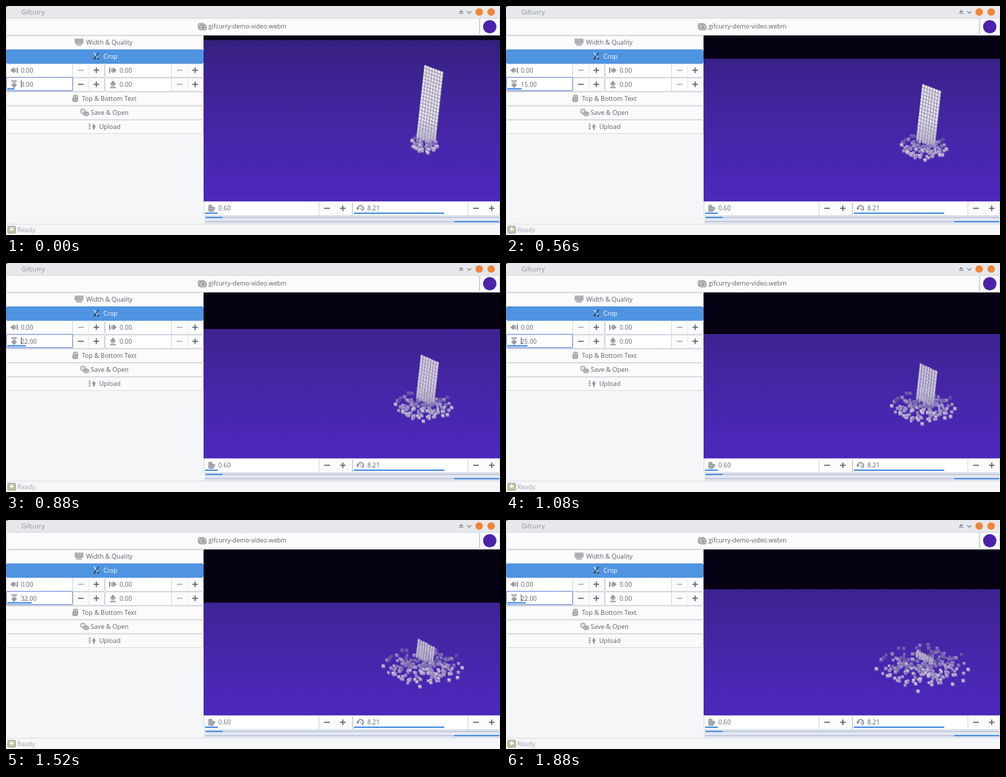
These frames come from a looping animation (700 by 326 pixels, 1920 ms). An HTML page with a canvas:

```html
<!DOCTYPE html>
<html lang="en">
<head>
<meta charset="utf-8">
<title>Crop demo</title>
<style>
html, body { margin: 0; width: 700px; height: 326px; overflow: hidden; background: #f5f6f7; }
canvas { display: block; }
</style>
</head>
<body>
<canvas id="stage" width="700" height="326"></canvas>
<script>
const ctx = document.getElementById('stage').getContext('2d');
const LOOP = 1920, STEP = 40, TAU = Math.PI * 2;
const INK = '#5c616c', BLUE = '#4a90e2', EDGE = '#d3d8e2', ICON = '#85888e', PALE = '#b4b6ba';

const rand = n => { const v = Math.sin(n * 12.9898) * 43758.5453; return v - Math.floor(v); };
const lerp = (a, b, k) => a + (b - a) * k;
const clamp = v => Math.max(0, Math.min(1, v));

// Linear interpolation through [time, value] points
function track(points, t) {
  let i = 1;
  while (i < points.length - 1 && t > points[i][0]) i++;
  const [t0, a] = points[i - 1], [t1, b] = points[i];
  return lerp(a, b, clamp((t - t0) / (t1 - t0)));
}

function rect(x, y, w, h, fill) { ctx.fillStyle = fill; ctx.fillRect(x, y, w, h); }
function frame(x, y, w, h, fill, edge = EDGE) {
  ctx.beginPath();
  ctx.roundRect(x + .5, y + .5, w - 1, h - 1, 1.5);
  ctx.fillStyle = fill; ctx.fill();
  ctx.lineWidth = 1; ctx.strokeStyle = edge; ctx.stroke();
}
function disc(x, y, r, fill) {
  ctx.beginPath(); ctx.arc(x, y, r, 0, TAU); ctx.fillStyle = fill; ctx.fill();
}
function poly(points, fill) {
  ctx.beginPath(); points.forEach(p => ctx.lineTo(...p)); ctx.closePath();
  ctx.fillStyle = fill; ctx.fill();
}
function line(points, color, width = 1) {
  ctx.beginPath(); points.forEach(p => ctx.lineTo(...p));
  ctx.strokeStyle = color; ctx.lineWidth = width; ctx.stroke();
}
function text(s, x, y, color = INK, size = 8.8) {
  ctx.font = `500 ${size}px "Open Sans", "Noto Sans", sans-serif`;
  ctx.fillStyle = color; ctx.fillText(s, x, y);
}
function steppers(x, y, gap, minus) {
  rect(x - 4, y - .75, 8, 1.5, minus);
  rect(x + gap - 4, y - .75, 8, 1.5, INK);
  rect(x + gap - .75, y - 4, 1.5, 8, INK);
}

// Small grey icons, drawn around their centre
const icons = {
  film() {
    frame(-6, -5, 10, 9, '#d5d6d8', ICON); frame(-4, -3, 10, 8, '#c4c6c9', ICON);
    poly([[0, -1], [4, 1], [0, 3]], ICON);
  },
  screen() {
    rect(-6, -5, 12, 7, '#96989d');
    for (let i = -4; i < 2; i += 2) rect(-5, i, 10, .7, '#ddd');
    rect(-4, 2, 8, 3, PALE);
  },
  scissors() {
    line([[-3.5, -5], [2.5, 3]], '#dfe8f4', 1.3); line([[3.5, -5], [-2.5, 3]], '#39414d', 1.3);
    disc(-2.5, 3.5, 1.4, '#39414d'); disc(2.5, 3.5, 1.4, '#39414d');
  },
  arrow() {
    rect(-5.5, -4, 1.5, 8, ICON); rect(-3, -2.5, 4, 5, PALE);
    poly([[0, -4.5], [5.5, 0], [0, 4.5]], '#96989d');
  },
  page() {
    frame(-3, -5, 7, 7, '#e3e4e6', ICON); frame(-4, -1, 8, 6, PALE, ICON);
    rect(-1, -3, 3, 1, ICON);
  },
  save() {
    frame(-6, -5, 7, 7, '#e3e4e6', ICON); frame(-2, -1, 8, 6, '#c9cacd', ICON);
    rect(0, 1, 4, 1, ICON);
  },
  upload() {
    poly([[-1, 0], [2, -4], [5, 0], [2, 4]], PALE); rect(1.3, -3, 1.4, 8, ICON);
    for (let i = -4; i < 5; i += 3) rect(-5, i, 2, 2, ICON);
  },
  rows() {
    [6, 10, 8].forEach((w, i) => frame(-5, -5 + i * 3, w, 4, PALE, ICON));
  },
  dial() {
    ctx.beginPath(); ctx.arc(0, 0, 3.8, 2.8, 7.3);
    ctx.strokeStyle = '#96989d'; ctx.lineWidth = 2; ctx.stroke();
    poly([[-6, -1], [-2, -1], [-4, 3]], ICON); line([[-1, -1], [3, 4]], PALE, 1.4);
  }
};
function icon(name, x, y, turn = 0) {
  ctx.save(); ctx.translate(x, y); ctx.rotate(turn * TAU / 4); icons[name](); ctx.restore();
}

function button(y, label, x, name, ix, active) {
  frame(0, y, 280, 20, active ? '#4f94e1' : '#fbfbfc', active ? BLUE : '#dadde4');
  icon(name, ix, y + 9.5);
  text(label, x, y + 12.5, active ? '#fff' : INK, 9);
}
function spin(x, y, value, turn, focused) {
  frame(x, y, 140, 20, '#fbfbfc');
  frame(x, y, 95, 20, '#fff');
  if (focused) frame(x, y - 1, 95, 20, '#fff', '#7288d8');
  rect(x + 117, y + 2, 1, 16, '#e6e8ec');
  icon('arrow', x + 11.5, y + 9.5, turn);
  text(value.toFixed(2), x + 21, y + 12.5);
  steppers(x + 106, y + 9.5, 22, focused ? INK : '#a9acb2');
}
function range(x, w, value, name, barEnd) {
  frame(x, 278, w, 21, '#fbfbfc');
  frame(x, 278, 164, 21, '#fff');
  icon(name, x + 11.5, 288);
  text(value, x + 21, 291);
  rect(x + 2, 294, barEnd - x - 2, 2, BLUE);
  steppers(x + 175, 288, 22.3, INK);
}

function cube(x, y, s, light) {
  const tone = k => `rgb(${lerp(72, 208, k)},${lerp(48, 204, k)},${lerp(152, 219, k)})`;
  rect(x - s / 2, y - s / 2, s, s, tone(light * .7));
  rect(x - s / 2, y - s / 2, s * .75, s * .6, tone(light));
}

// Outermost cubes: start and end of each path
const strays = [[598, 209, 584, 244], [576, 192, 525, 212], [611, 200, 655, 213],
  [606, 205, 648, 229], [582, 203, 541, 222], [607, 203, 633, 234]];

function debris(t, back) {
  const k = t / 1880, count = 55 + 170 * k;
  const rx = 19 + 47 * k, ry = 15 + 20 * k, cy = 195 + 12 * clamp(t / 1500);
  for (let i = 0; i < count; i++) {
    const a = rand(i + 1) * TAU, depth = Math.sin(a);
    if ((depth < -.2) !== back) continue;
    const r = Math.pow(rand(i + 301), .75) * (1 - .4 * i / 225);
    const light = clamp(.62 + depth * r * .45 + (rand(i + 601) - .5) * .5);
    cube(593 - k + Math.cos(a) * r * rx, cy + depth * r * ry, 3.6 + rand(i + 901) * 1.4, light);
  }
  if (!back) strays.forEach(([x0, y0, x1, y1]) => cube(lerp(x0, x1, k), lerp(y0, y1, k), 4.8, .95));
}

function tower(t) {
  const top = track([[0, 84], [240, 95], [560, 111], [880, 130], [1280, 154], [1520, 168], [1880, 184]], t);
  const left = 593 - (top - 84) * .11, age = clamp((t - 500) / 800);
  const base = 187 + 7 * clamp(t / 1400), foot = left - (base - top) * .11;
  const pitch = lerp(3.85, 3.5, age), slope = lerp(1.45, 1.85, age);
  ctx.globalAlpha = .9 - age * .4;
  poly([[left, top], [left + pitch * 7, top + slope * 7], [foot + pitch * 7, base + 9], [foot, base - 2]], '#8d88a3');
  for (let c = 0; c < 7; c++) {
    const x0 = left + c * pitch, y0 = top + c * slope + age * rand(c + 40) * 2;
    const end = base + c * 1.7 + rand(c + 70) * 5;
    for (let y = y0; y < end; y += 4.9) {
      const low = clamp(Math.max((y - 160) / 40, age * .6));
      const h = Math.min(lerp(4.2, 4.9, Math.max(age, clamp((y - 165) / 12))), end - y);
      const x = x0 - (y - y0) * .11;
      ctx.globalAlpha = 1 - low * .25;
      poly([[x, y], [x + pitch * .8, y + 1.1], [x + pitch * .7, y + 1.1 + h], [x - .5, y + h]],
        `rgb(${230 - low * 42},${227 - low * 46},${233 - low * 26})`);
    }
  }
  ctx.globalAlpha = 1;
}

function video(t) {
  const sky = ctx.createLinearGradient(0, 42, 0, 278);
  [[0, '#35207c'], [.25, '#3c2391'], [.6, '#4526a8'], [1, '#4d28bd']].forEach(s => sky.addColorStop(...s));
  rect(280, 42, 420, 236, sky);
  debris(t, true);
  tower(t);
  debris(t, false);
  const edge = track([[0, 48.5], [240, 61], [560, 75], [880, 94], [1280, 108], [1520, 117.5], [1880, 98.5]], t);
  rect(280, 42, 420, edge - 42, '#060113');
}

function header() {
  rect(0, 0, 700, 18, '#e6e8eb');
  rect(0, 0, 2, 1, '#333');
  text('Gifcurry', 22, 12, '#8b8f98');
  poly([[642, 9], [645, 5.5], [648, 9]], '#858a94');
  rect(642, 10, 6, 1, '#858a94');
  line([[653.5, 7.5], [656.5, 10.5], [659.5, 7.5]], '#858a94', 1.2);
  disc(670.5, 8.5, 5.3, '#f08437');
  disc(687.5, 8.5, 5.3, '#f08437');
  frame(0, 17, 671, 25, '#fbfbfc');
  frame(671, 17, 29, 25, '#fbfbfc');
  icon('film', 278, 29.5);
  text('gifcurry-demo-video.webm', 287, 32);
  disc(685.5, 29.5, 9.5, '#4a22ab');
}

function panel(t) {
  const crop = Math.floor(track([[0, 3], [240, 8], [560, 15], [880, 22], [1280, 29], [1440, 32], [1540, 32], [1880, 22]], t) + 1e-6);
  button(42, 'Width & Quality', 113.5, 'screen', 103.5);
  button(62, 'Crop', 138, 'scissors', 128, true);
  spin(0, 82, 0, 2);
  spin(140, 82, 0, 0);
  spin(0, 102, crop, 1, true);
  spin(140, 102, 0, 3);
  rect(2, 117, 7.5 + crop * .84, 2, BLUE);
  if (t < 180 || (t - 180) % 1200 >= 420) rect(21, 106, 1, 10, INK);
  button(122, 'Top & Bottom Text', 107.5, 'page', 98);
  button(142, 'Save & Open', 120, 'save', 111.5);
  button(162, 'Upload', 132, 'upload', 122.5);
}

function footer() {
  range(280, 211, '0.60', 'rows', 300);
  range(491, 209, '8.21', 'dial', 621);
  rect(281, 299, 419, 11, '#e3e7f0');
  rect(282, 300, 417, 2, '#c3cbdd');
  rect(283, 300, 24, 2, BLUE);
  rect(282, 306, 417, 2, '#c3cbdd');
  rect(635, 306, 64, 2, BLUE);
  rect(0, 310, 700, 1, '#dde0e6');
  frame(2, 313, 12, 11, '#c2c3a5', '#a5a78c');
  rect(7, 315, 2, 5, '#fff');
  rect(5, 317, 6, 1.5, '#fff');
  text('Ready.', 16, 321.5, '#a3a7ae');
}

function draw() {
  const t = Math.floor(performance.now() % LOOP / STEP) * STEP;
  rect(0, 0, 700, 326, '#f5f6f7');
  header();
  panel(t);
  video(t);
  footer();
  requestAnimationFrame(draw);
}
draw();
</script>
</body>
</html>
```
